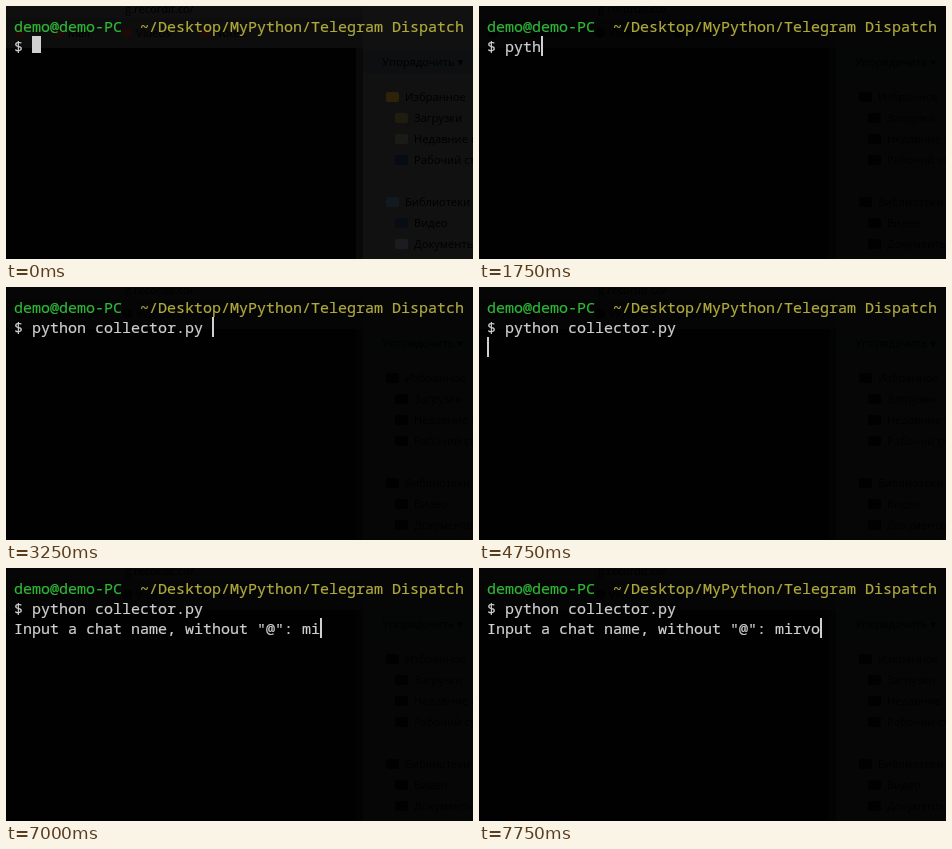
Recreate the animation shown at these times as an HTML page. Size 467x253 px, loop 8000 ms.

```html
<!DOCTYPE html>
<html lang="en">
<head>
<meta charset="utf-8">
<title>Terminal session</title>
<style>
html, body { margin: 0; width: 100%; height: 100%; overflow: hidden; background: #010101; }
svg { display: block; width: 467px; height: 253px; }
text { white-space: pre; }
.term { font: 15px "Noto Sans Mono", monospace; fill: #d0d0d0; stroke: #d0d0d0; stroke-width: .2px; }
.green { fill: #2fb837; stroke: #2fb837; }
.gold { fill: #b0aa3c; stroke: #b0aa3c; }
.ui { font: 11.2px "Open Sans", sans-serif; fill: #010101; }
.dim .icon { fill: #010101; }
</style>
</head>
<body>
<svg viewBox="0 0 467 253">
  <rect width="467" height="253" fill="#010101"/>
  <g id="backdrop">
    <rect width="357" height="12" fill="#0f0f0f"/>
    <rect y="12" width="357" height="30" fill="#0d0d0d"/>
    <rect x="350" y="42" width="7" height="211" fill="#090909"/>
    <text class="ui" x="119" y="7">g.recordit.co/</text>
    <circle class="icon" cx="14" cy="27" r="5" fill="#1c0a08"/>
    <circle class="icon" cx="53" cy="27" r="5" fill="#1c0a08"/>
    <circle class="icon" cx="121" cy="27" r="5" fill="#1c0a08"/>
    <circle class="icon" cx="199" cy="27" r="5" fill="#1c0a08"/>
    <text class="ui" x="62" y="31">Mail</text>
    <text class="ui" x="130" y="31">Videos</text>
    <text class="ui" x="208" y="31">Notes</text>
    <rect x="357" width="110" height="253" fill="#111111"/>
    <rect x="357" y="44" width="110" height="23" fill="#0e0f11"/>
    <g id="items"></g>
  </g>
  <text class="term green" x="8" y="26">demo@demo-PC</text>
  <text class="term gold" x="134" y="26">~/Desktop/MyPython/Telegram Dispatch</text>
  <text class="term" x="8" y="46" id="command"></text>
  <text class="term" x="8" y="66" id="prompt"></text>
  <rect id="cursor" fill="#d0d0d0"/>
</svg>
<script>
const LOOP = 8000, CHAR = 9;
const COMMAND = "python collector.py ";
const QUESTION = 'Input a chat name, without "@": ';
const CHAT = "mirvo";
const $ = id => document.getElementById(id);

// [label, x, y, icon colour]
const items = [
  ["Упорядочить ▾", 376, 60, ""],
  ["Избранное", 399, 95, "#2e2208"],
  ["Загрузки", 408, 116, "#201c10"],
  ["Недавние места", 408, 137, "#1c1a16"],
  ["Рабочий стол", 408, 158, "#070b12"],
  ["Библиотеки", 399, 200, "#121a20"],
  ["Видео", 408, 221, "#080d14"],
  ["Документы", 408, 242, "#1a1c1f"]
];
$("items").innerHTML = items.map(([label, x, y, icon]) =>
  (icon ? `<rect class="icon" x="${x - 19}" y="${y - 9}" width="13" height="10" rx="2" fill="${icon}"/>` : "") +
  `<text class="ui" x="${x}" y="${y}">${label}</text>`).join("");

// [start ms, characters typed]
const commandSteps = [[0, 0], [1250, 1], [1500, 3], [1750, 4], [2250, 5], [2500, 6], [2750, 8], [3000, 10], [3250, 20]];
const chatSteps = [[0, 0], [7000, 2], [7500, 4], [7750, 5]];
const hidden = [[750, 1250], [4250, 4750], [5250, 5500], [6000, 6500]];

const typed = (steps, t) => steps.filter(s => t >= s[0]).pop()[1];

function place(x, y, width, height) {
  const box = { x, y, width, height };
  for (const key in box) $("cursor").setAttribute(key, box[key]);
}

function draw(t) {
  const command = COMMAND.slice(0, typed(commandSteps, t));
  const prompt = t < 5500 ? "" : QUESTION + CHAT.slice(0, typed(chatSteps, t));
  $("command").textContent = "$ " + command;
  $("prompt").textContent = prompt;

  if (t < 250) place(26, 30, 9, 17);
  else if (t < 3750) place(26 + command.length * CHAR, 30, 2, 20);
  else place(8 + prompt.length * CHAR, 50, 2, 20);
  const off = hidden.some(([from, to]) => t >= from && t < to);
  $("cursor").setAttribute("opacity", off ? 0 : 1);

  $("backdrop").setAttribute("class", t < 250 ? "" : "dim");
  $("backdrop").setAttribute("opacity", t < 250 ? 1 : 0.36);
}

const start = performance.now();
function tick() {
  draw((performance.now() - start) % LOOP);
  requestAnimationFrame(tick);
}
tick();
</script>
</body>
</html>
```
